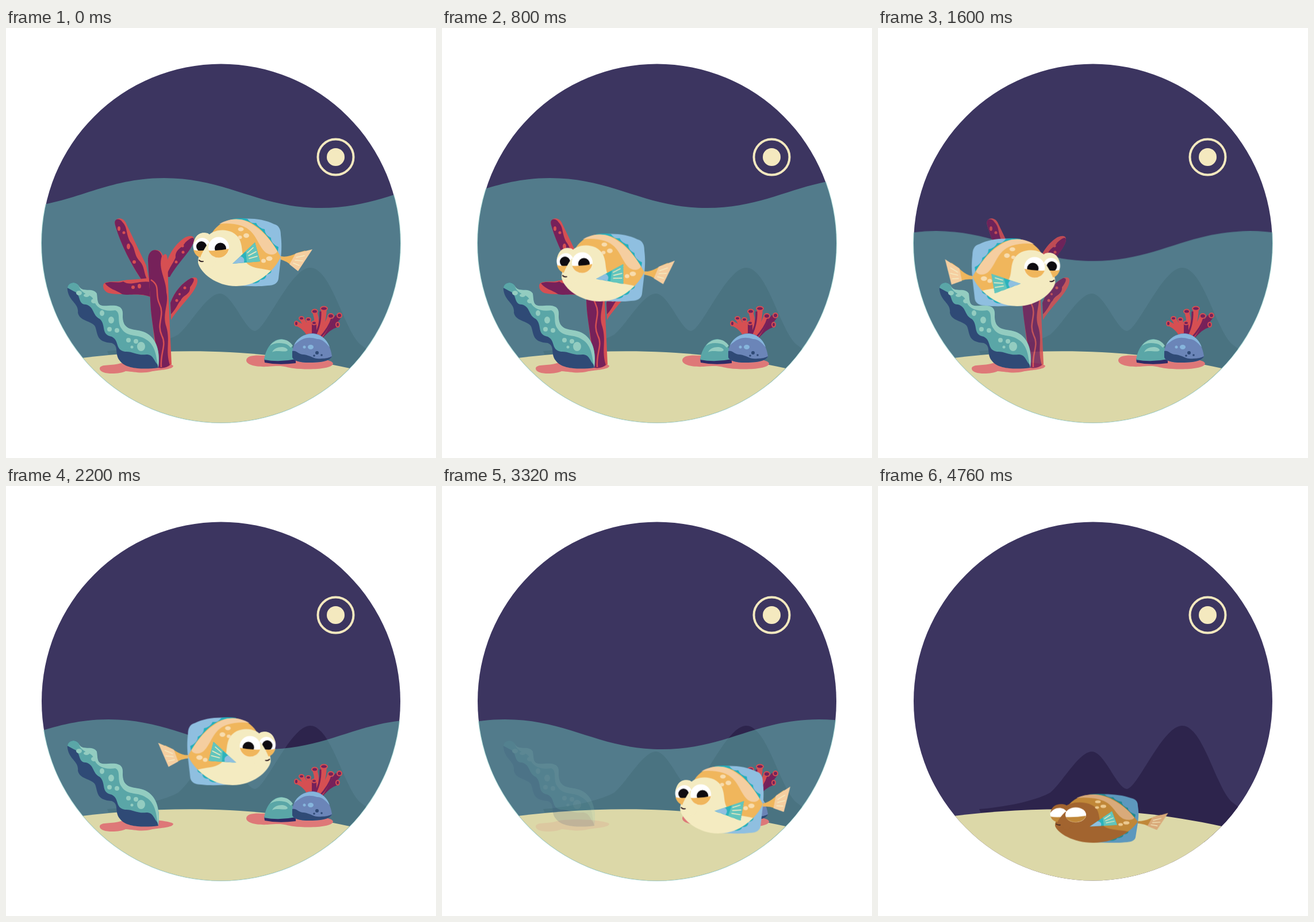
Write an HTML page without scripts that moves like this. It is 748x748 px and loops after 4800 ms.

```html
<!DOCTYPE html>
<html lang="en">
<head>
<meta charset="utf-8">
<title>Shrinking sea</title>
<style>
html, body { margin: 0; width: 100%; height: 100%; overflow: hidden; background: #fff; }
svg { display: block; width: 100vw; height: 100vh; }
svg [class] { animation: 4.8s linear infinite; }

.red { fill: #d64f52; }
.wine { fill: #76215a; }
.pink { fill: #de7878; }
.sea { fill: #5aa6a7; }
.mint { fill: #93ccc0; }
.navy { fill: #2f4a76; }
.line { fill: none; stroke: #f4ebc1; stroke-width: 1.6; stroke-linecap: round; }

/* water */
svg .level { animation-name: level; animation-timing-function: cubic-bezier(.37,0,.63,1); }
svg .drift { animation-name: drift; }
@keyframes level {
  0%, 19.17% { transform: translateY(261px); }
  43.33%, 70% { transform: translateY(406px); }
  93.33%, 100% { transform: translateY(700px); }
}
@keyframes drift {
  0% { transform: translateX(275px); }
  33.33% { transform: translateX(101px); }
  52.92% { transform: translateX(222px); }
  77.5% { transform: translateX(52px); }
  93.33%, 100% { transform: translateX(-50px); }
}

/* reef */
svg .fade-tree { animation-name: fade-tree; }
svg .fade-ribbon { animation-name: fade-ribbon; }
svg .fade-rocks { animation-name: fade-rocks; }
@keyframes fade-tree { 31.67% { opacity: 1; } 43.33%, 100% { opacity: 0; } }
@keyframes fade-ribbon { 60.42% { opacity: 1; } 70.83%, 100% { opacity: 0; } }
@keyframes fade-rocks { 69.17% { opacity: 1; } 80.83%, 100% { opacity: 0; } }

/* fish path */
svg .swim-x { animation-name: swim-x; animation-timing-function: cubic-bezier(.37,0,.63,1); }
svg .swim-y { animation-name: swim-y; }
svg .turn { animation-name: turn; animation-timing-function: step-end; transform-origin: 430px 390px; }
svg .sink { animation-name: sink; animation-timing-function: ease-in-out; transform-origin: 430px 390px; }
@keyframes swim-x {
  0% { transform: none; }
  30.83% { transform: translateX(-223px); }
  61.67% { transform: translateX(105.5px); }
  87.5%, 100% { transform: translateX(-26px); }
}
@keyframes swim-y {
  0% { transform: none; animation-timing-function: cubic-bezier(.61,1,.88,1); animation-timing-function: cubic-bezier(.39,.58,.57,1); }
  30.83% { transform: translateY(34px); animation-timing-function: cubic-bezier(.55,0,.68,1); }
  61.67% { transform: translateY(145px); animation-timing-function: cubic-bezier(.3,0,.6,1); }
  87.5%, 100% { transform: translateY(188px); }
}
@keyframes turn {
  0% { transform: none; }
  30.83% { transform: scaleX(-1); }
  61.67%, 100% { transform: none; }
}
@keyframes sink { 0%, 79% { transform: none; } 92%, 100% { transform: scaleY(.72); } }

/* fins */
svg .tail { animation-name: tail; animation-timing-function: ease-in-out; transform-origin: 477px 398px; }
svg .fin { animation-name: fin; animation-timing-function: ease-in-out; transform-origin: 394px 410px; }
@keyframes tail {
  0%, 60% { transform: rotate(0deg); }
  8.33%, 52% { transform: rotate(-19deg); }
  16.67% { transform: rotate(-7deg); }
  25% { transform: rotate(0deg); }
  33.33% { transform: rotate(-19deg); }
  39.6% { transform: rotate(-1deg); }
  45.83% { transform: rotate(-10deg); }
  68.75% { transform: rotate(-19deg); }
  77.5% { transform: rotate(-3deg); }
  85% { transform: rotate(-17deg); }
  92%, 100% { transform: rotate(-8deg); }
}
@keyframes fin {
  0%, 25%, 92%, 100% { transform: rotate(0deg); }
  8.33%, 33.33%, 52%, 68.75% { transform: rotate(25deg); }
  16.67% { transform: rotate(15deg); }
  45.83% { transform: rotate(1deg); }
  60% { transform: rotate(3deg); }
  77.5% { transform: rotate(21deg); }
}

/* fish colours, wet and dry */
.cream { --wet: #f4ebc1; --dry: #a2642f; }
.orange { --wet: #f0b65c; --dry: #c08738; }
.peach { --wet: #f5cea0; --dry: #d9aa7a; }
.spot { --wet: #f8dcae; --dry: #ecc98f; }
.blue { --wet: #8fbfe0; --dry: #5d98bd; }
.teal { --wet: #22b0bd; --dry: #1e8a8f; }
svg .dry { fill: var(--wet); animation-name: dry; }
svg .pupil { fill: #0e0b10; animation-name: close; }
@keyframes dry { 0%, 79% { fill: var(--wet); } 92%, 100% { fill: var(--dry); } }
@keyframes close { 0%, 83% { opacity: 1; } 91%, 100% { opacity: 0; } }
</style>
</head>
<body>
<svg viewBox="0 0 748 748">
  <defs>
    <clipPath id="globe"><circle cx="374" cy="374.5" r="312"/></clipPath>
    <clipPath id="rim"><circle cx="374" cy="374.5" r="313"/></clipPath>
  </defs>

  <circle cx="374" cy="374.5" r="312" fill="#3c3560"/>
  <g fill="#f4e9bf">
    <circle cx="573.5" cy="224.5" r="15.5"/>
    <circle cx="573.5" cy="224.5" r="31" fill="none" stroke="#f4e9bf" stroke-width="4"/>
  </g>
  <path clip-path="url(#globe)" fill="#2d244c" d="M176 562C226 558 279 546 300 533C322 514 350 462 372 462C394 462 416 527 433 527C452 525 495 417 529 417C566 417 588 526 616 550L645 572V620H200Z"/>

  <g clip-path="url(#rim)">
    <g class="level"><g class="drift">
      <path fill="#68c1b6" opacity=".5" d="M-546 0c110 0 163 52 273 52s163-52 273-52s163 52 273 52s163-52 273-52s163 52 273 52s163-52 273-52V800H-546Z"/>
    </g></g>
  </g>
  <path clip-path="url(#globe)" fill="#dcd8a8" d="M100 578C270 555 430 555 598 592L640 602V700H100Z"/>

  <!-- coral ribbon shadow stays below the tree -->
  <path class="pink fade-ribbon" d="M163 592C164 584 185 588 200 583C230 576 292 583 291 588C290 594 268 595 255 597C235 602 225 598 208 597C195 603 162 603 163 592Z"/>

  <g class="fade-tree">
    <path class="red" d="M190 343C186 330 202 327 208 338L244 413L250 445L238 441C222 420 199 375 190 343Z"/>
    <path class="wine" d="M190 343C186 330 199 331 202 337C212 347 208 357 216 372C226 384 222 395 233 406C242 416 239 428 247 440L238 441C218 412 199 375 190 343Z"/>
    <path class="red" d="M169 449C169 441 178 441 195 441C215 436 235 438 252 434V468C230 460 200 466 178 461Q169 457 169 449Z"/>
    <path class="wine" d="M172 444C184 439 193 445 204 441C216 450 232 438 252 442V468C232 460 214 466 202 463C190 455 181 455 172 444Z"/>
    <path class="red" d="M277 428C275 405 292 376 312 364Q327 358 327 368C326 384 300 406 284 432Z"/>
    <path class="wine" d="M278 433C286 413 290 411 295 399C294 385 306 383 312 373Q326 360 327 368C326 385 300 406 285 433Z"/>
    <path class="red" d="M286 478C294 457 307 443 322 435Q334 431 333 441C331 460 302 483 287 508Z"/>
    <path class="wine" d="M286 478C294 457 307 443 322 435C332 434 324 446 320 451C321 464 308 464 304 474C299 478 298 486 287 498Z"/>
    <path class="red" d="M247 405C246 382 269 381 273 396Q280 388 281 403L283 475L288 585Q278 593 264 591L252 490Z"/>
    <path class="wine" d="M247 405C246 381 268 382 271 397C264 420 279 437 279 460C284 480 271 497 279 520C286 545 277 560 285 586Q278 593 264 591C264 560 256 530 252 490Z"/>
    <path d="M252 438C270 449 258 462 267 480C277 500 261 514 271 535C280 552 268 564 270 590" fill="none" stroke="#d64f52" stroke-width="2.5"/>
    <g class="red">
      <ellipse cx="196.500" cy="349" rx="2.500" ry="4"/><circle cx="205" cy="356" r="2.500"/>
      <ellipse cx="213" cy="380" rx="3" ry="5"/><circle cx="223" cy="407" r="3"/>
      <circle cx="221" cy="451" r="3"/><ellipse cx="232" cy="449" rx="3" ry="4"/>
      <circle cx="307" cy="379" r="2.500"/><circle cx="308" cy="390" r="2.500"/><circle cx="296" cy="407" r="2.500"/>
      <circle cx="311" cy="452" r="2.500"/><circle cx="297" cy="474" r="2.500"/><circle cx="302" cy="463" r="2"/>
    </g>
  </g>

  <g class="fade-ribbon">
    <path class="navy" d="M107 456C105 444 119 439 126 447C132 463 150 449 158 462C160 478 158 485 178 483C202 481 204 489 203 503C204 528 224 523 238 528C260 535 269 560 265 591C242 594 210 594 199 580C187 567 198 554 184 548C159 546 160 536 156 522C154 509 128 512 125 495C127 479 110 476 107 456Z"/>
    <path class="sea" d="M107 452C107 444 119 439 126 447C132 463 150 449 158 462C160 478 158 485 178 483C202 481 204 489 203 503C204 528 224 523 238 528C260 535 269 560 265 587C256 578 257 568 244 568C228 570 220 562 207 563C189 560 198 544 184 537C164 533 175 517 163 506C150 500 154 485 139 481C124 481 131 462 118 458Z"/>
    <path class="mint" d="M126 447C132 463 150 449 158 462C160 478 158 485 178 483C202 481 204 489 203 503C204 528 224 523 238 528C260 535 269 560 265 591C261 575 262 556 247 544C229 530 212 540 201 523C192 511 201 496 190 491C172 494 157 488 153 474C149 461 131 466 126 447Z"/>
    <g class="mint">
      <ellipse cx="127" cy="461" rx="5" ry="4"/><ellipse cx="140" cy="465" rx="5" ry="3"/>
      <ellipse cx="153" cy="475" rx="5" ry="4"/><ellipse cx="167" cy="496" rx="4" ry="5"/>
      <ellipse cx="183" cy="508" rx="5" ry="6"/><circle cx="180" cy="524" r="4"/><circle cx="193" cy="526" r="4"/>
      <circle cx="213" cy="543" r="4"/><circle cx="226" cy="545" r="4"/>
      <ellipse cx="235" cy="554" rx="7" ry="8"/><circle cx="219" cy="555" r="2.500"/>
    </g>
  </g>

  <g class="fade-rocks">
    <path class="pink" d="M418 578C419 567 440 569 470 571C510 572 570 574 569 584C566 594 525 595 500 592C485 590 485 586 455 589C435 590 418 586 418 578Z"/>
    <g fill="none" stroke-width="8">
      <path stroke="#d64f52" d="M530 540Q523 521 505 514M531 540Q523 520 514 505M533 540L526 508M538 540Q544 515 537 493"/>
      <path stroke="#76215a" d="M536 540L536 514M545 540Q560 521 577 516"/>
      <path stroke="#76215a" stroke-width="10" d="M542 540Q565 520 578 502"/>
      <path stroke="#d64f52" stroke-width="10" d="M541 540Q552 513 553 489M543 540Q557 522 564 503"/>
      <path stroke="#76215a" stroke-width="3" d="M535 540Q548 518 547 493M545 540Q562 522 567 505"/>
    </g>
    <g fill="#76215a" stroke="#d64f52" stroke-width="2">
      <ellipse cx="505" cy="514" rx="3" ry="4"/><ellipse cx="514" cy="505" rx="4" ry="3"/>
      <ellipse cx="526" cy="507" rx="4" ry="3"/><ellipse cx="537" cy="493" rx="5" ry="3.500"/>
      <ellipse cx="553" cy="488" rx="6" ry="3.500"/><ellipse cx="565" cy="501" rx="5" ry="4"/>
      <ellipse cx="580" cy="500" rx="4" ry="4"/><ellipse cx="577" cy="516" rx="3" ry="4"/><ellipse cx="536" cy="513" rx="4" ry="3"/>
    </g>
    <path fill="#2e2a66" d="M449 575L504 570V583Q474 587 450 582Z"/>
    <path class="sea" d="M449 577C452 555 465 541 479 541C492 543 500 552 504 576Q475 582 449 577Z"/>
    <path class="mint" d="M459 553C470 538 490 538 499 553L495 556C490 550 488 550 484 549C474 547 466 548 459 553ZM463 564C467 554 486 552 490 560C489 566 470 559 463 564Z"/>
    <path fill="#6b85b8" d="M498 573C495 550 512 531 534 531C552 532 564 550 567 571Q564 581 533 582Q502 583 498 573Z"/>
    <path fill="#86b5dc" d="M501 552C511 528 551 522 563 555C556 548 551 541 541 541C525 536 515 539 501 552Z"/>
    <path class="navy" d="M498 562C506 560 508 568 518 568C532 570 535 577 549 575Q560 575 567 571Q564 581 533 582Q502 583 498 573Z"/>
    <ellipse cx="530" cy="555" rx="5" ry="4" fill="#86b5dc"/><circle cx="519" cy="555" r="2.500" fill="#86b5dc"/>
    <g class="navy"><circle cx="541" cy="565" r="3"/><circle cx="549" cy="569" r="1.800"/><circle cx="536" cy="570" r="1.800"/></g>
  </g>

  <g class="swim-x"><g class="swim-y"><g class="turn"><g class="sink">
    <g class="tail">
      <path class="orange dry" d="M473 395Q485 402 507 391L521 387L500 416Q487 404 475 402Z"/>
      <path class="peach dry" d="M504 392L533 385L508 423L493 411Z"/>
      <path class="line" d="M505 399L519 396M503 404L516 405M500 409L510 413"/>
    </g>
    <path class="blue dry" d="M385 336C410 329 445 330 466 341Q478 344 478 360C481 385 478 400 474 436Q472 448 455 448C440 450 420 449 405 448Z"/>
    <path class="teal dry" d="M394 332Q412 330 420 332Q426 341 435 339Q439 348 450 350Q450 360 461 365Q460 374 474 381L472 395L468 408Q467 416 461 419Q464 427 453 429Q453 438 442 438Q440 445 428 444L400 390Z"/>
    <path class="orange dry" d="M354 364C367 336 394 327 420 336C449 347 469 382 478 398C470 415 455 432 430 443L400 449L350 400Z"/>
    <path class="peach dry" d="M371 341C385 333 400 330 416 335C445 347 464 374 472 388C469 396 456 396 449 388C434 371 434 346 397 341Q383 339 371 341Z"/>
    <path class="cream dry" d="M350 364C358 349 393 345 406 367C414 384 407 397 421 411C431 419 447 418 461 422C442 441 422 449 400 449C366 449 338 426 334 408C334 393 343 376 350 364Z"/>
    <g class="spot dry">
      <ellipse cx="408.500" cy="350" rx="5" ry="3.500"/><ellipse cx="418" cy="361" rx="5" ry="4"/><ellipse cx="407" cy="364" rx="3.500" ry="3"/>
      <ellipse cx="458" cy="401" rx="5.500" ry="4"/><ellipse cx="448" cy="405" rx="4" ry="3.500"/>
    </g>

    <path class="cream dry" d="M328 372C329 359 340 354 351 357Q359 362 357 374L340 395Z"/>
    <ellipse cx="340" cy="379" rx="14.500" ry="17" fill="#fff"/>
    <circle class="pupil" cx="340" cy="380" r="9"/>
    <path class="orange dry" d="M326 386Q340 389 354 385Q351 398 342 400Q330 399 326 386Z"/>
    <path class="cream dry" d="M326 377C327 359 342 352 354 359Q358 364 355 374C347 360 332 363 326 377Z"/>
    <path class="cream dry" d="M352 374Q342 387 336 404L356 420L370 397Z"/>
    <circle cx="370" cy="381.500" r="18" fill="#fff"/>
    <circle class="pupil" cx="373" cy="383.500" r="10"/>
    <path class="orange dry" d="M352.500 387Q370 388 387.500 384A18 18 0 0 1 352.500 387Z"/>
    <path d="M336 404Q339 407 343 406" fill="none" stroke="#2a1a20" stroke-width="1.800" stroke-linecap="round"/>

    <g class="fin">
      <path fill="#2bb3bd" d="M394 410L433 373L442 406Z"/>
      <path fill="#62c5bd" d="M417 388L433 373L442 406L419 408Z"/>
      <path fill="#8fbfe0" d="M394 410L408 397Q416 399 414 408Z"/>
      <path class="line" d="M420 391L430 382M422 396L435 389M423 401L437 397"/>
    </g>
  </g></g></g></g>
</svg>
</body>
</html>
```
